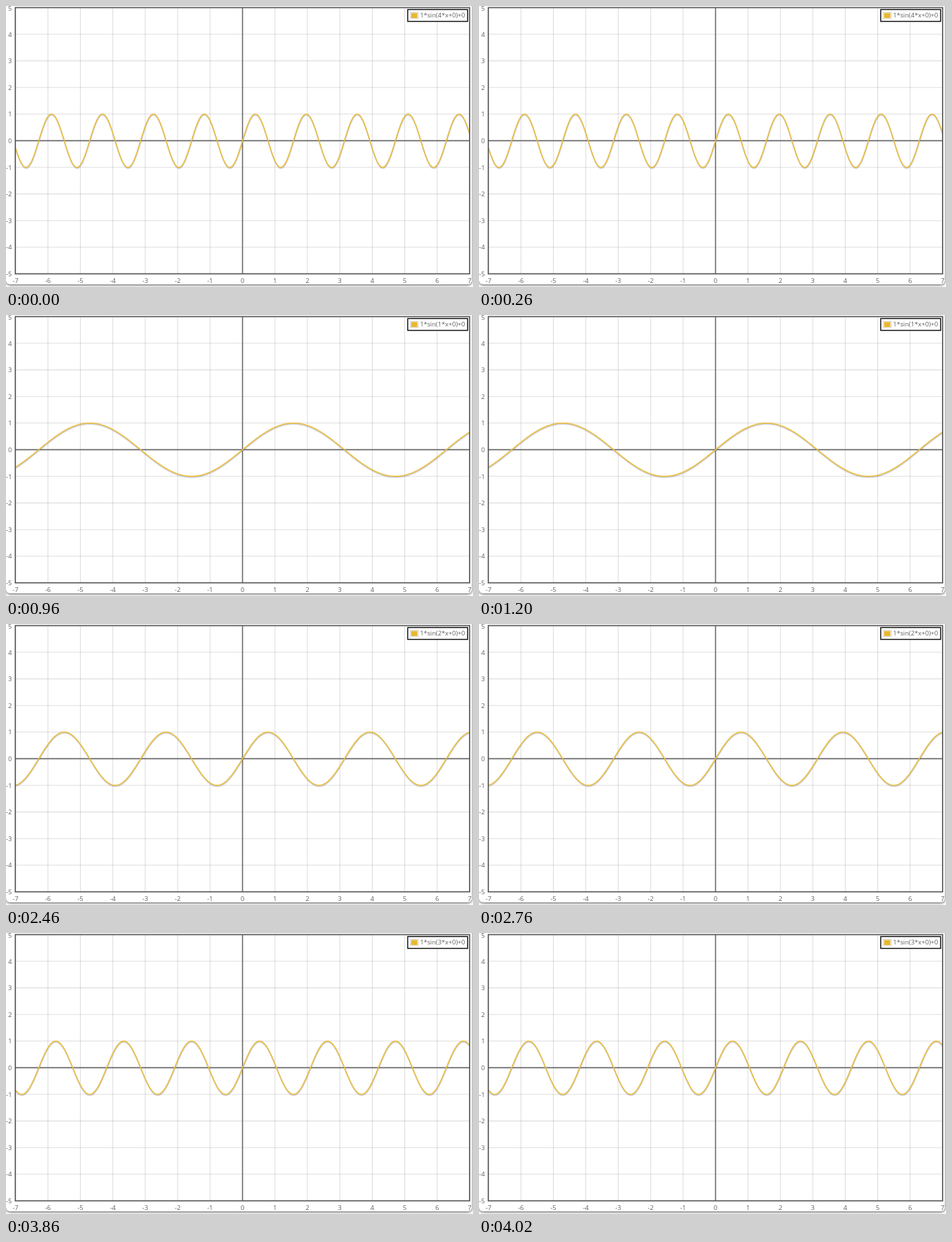
Animation of 694 by 418 pixels, one loop 5080 ms. Source, as an HTML page:

```html
<!DOCTYPE html>
<html lang="en">
<head>
<meta charset="utf-8">
<title>Sine frequency</title>
<style>
  html, body { margin: 0; width: 100%; height: 100%; overflow: hidden; background: #fff; }
  svg { display: block; width: 694px; height: 418px; }
  text { font-family: "Open Sans", "Noto Sans", sans-serif; font-size: 9.6px; fill: #606060; }
  .card { fill: #fff; filter: drop-shadow(0 1px 2px rgba(0, 0, 0, .7)); }
  .grid { stroke: #545454; stroke-opacity: .2; stroke-width: 1.1; }
  .axis { stroke: #666; stroke-width: 1.6; }
  .curve { fill: none; stroke-linejoin: round; }
</style>
</head>
<body>
<svg id="stage" viewBox="0 0 694 418">
  <defs><clipPath id="plot"><rect x="14" y="2.5" width="675" height="396"/></clipPath></defs>
  <rect class="card" x="0" y="-12" width="692.3" height="426" rx="6"/>
  <g id="lines"></g>
  <g clip-path="url(#plot)">
    <path class="curve" data-wave stroke="#303060" stroke-opacity=".22" stroke-width="2" transform="translate(.3 1.4)"/>
    <path class="curve" data-wave stroke="#e8c04a" stroke-width="1.8"/>
  </g>
  <rect x="13.8" y="2.4" width="675.2" height="396" fill="none" stroke="#5c5c5c" stroke-width="1.8"/>
  <g id="labels"></g>
  <rect x="597" y="5.3" width="89" height="17.6" fill="#fff" stroke="#111" stroke-width="1.5"/>
  <rect x="600.7" y="9.3" width="12" height="9.8" fill="#fff" stroke="#ccc" stroke-width=".9"/>
  <rect x="602" y="10.4" width="9.4" height="7.6" fill="#e8b830"/>
  <text id="formula" x="615.2" y="17.4"></text>
</svg>
<script>
const SVG = "http://www.w3.org/2000/svg";
const LOOP = 5080;
const steps = [[0, 4], [960, 1], [2460, 2], [3860, 3]];
const px = x => 351.5 + x * 48.2;
const py = y => 200.4 - y * 39.6;
const byId = id => document.getElementById(id);
const waves = document.querySelectorAll("[data-wave]");

function add(parent, tag, attrs, text = "") {
  const node = document.createElementNS(SVG, tag);
  for (const key in attrs) node.setAttribute(key, attrs[key]);
  node.textContent = text;
  byId(parent).append(node);
}

function addLine(d, isAxis) {
  add("lines", "path", { d, class: isAxis ? "axis" : "grid" });
}

for (let n = -6; n <= 6; n++) if (n) addLine(`M${px(n)} 2.5V398.4`);
for (let n = -4; n <= 4; n++) if (n) addLine(`M14 ${py(n)}H689`);
addLine("M351.5 2.5V398.4", true);
addLine("M14 200.4H689", true);

for (let n = -7; n <= 7; n++)
  add("labels", "text", { x: px(n), y: 412.4, "text-anchor": "middle" }, n);
for (let n = -5; n <= 5; n++)
  add("labels", "text", { x: 8.7, y: py(n) + (n === 5 ? 4.4 : 3.6), "text-anchor": "end" }, n);

function wavePath(frequency) {
  const points = [];
  for (let x = -7; x <= 7.001; x += 0.02)
    points.push(`${px(x).toFixed(2)} ${py(Math.sin(frequency * x)).toFixed(2)}`);
  return "M" + points.join("L");
}

let shown;
function render(time) {
  const t = time % LOOP;
  const frequency = steps.filter(([start]) => start <= t).pop()[1];
  if (frequency === shown) return;
  shown = frequency;
  const d = wavePath(frequency);
  waves.forEach(wave => wave.setAttribute("d", d));
  byId("formula").textContent = `1*sin(${frequency}*x+0)+0`;
}

const origin = performance.now();
function tick() {
  render(performance.now() - origin);
  requestAnimationFrame(tick);
}
tick();
</script>
</body>
</html>
```
